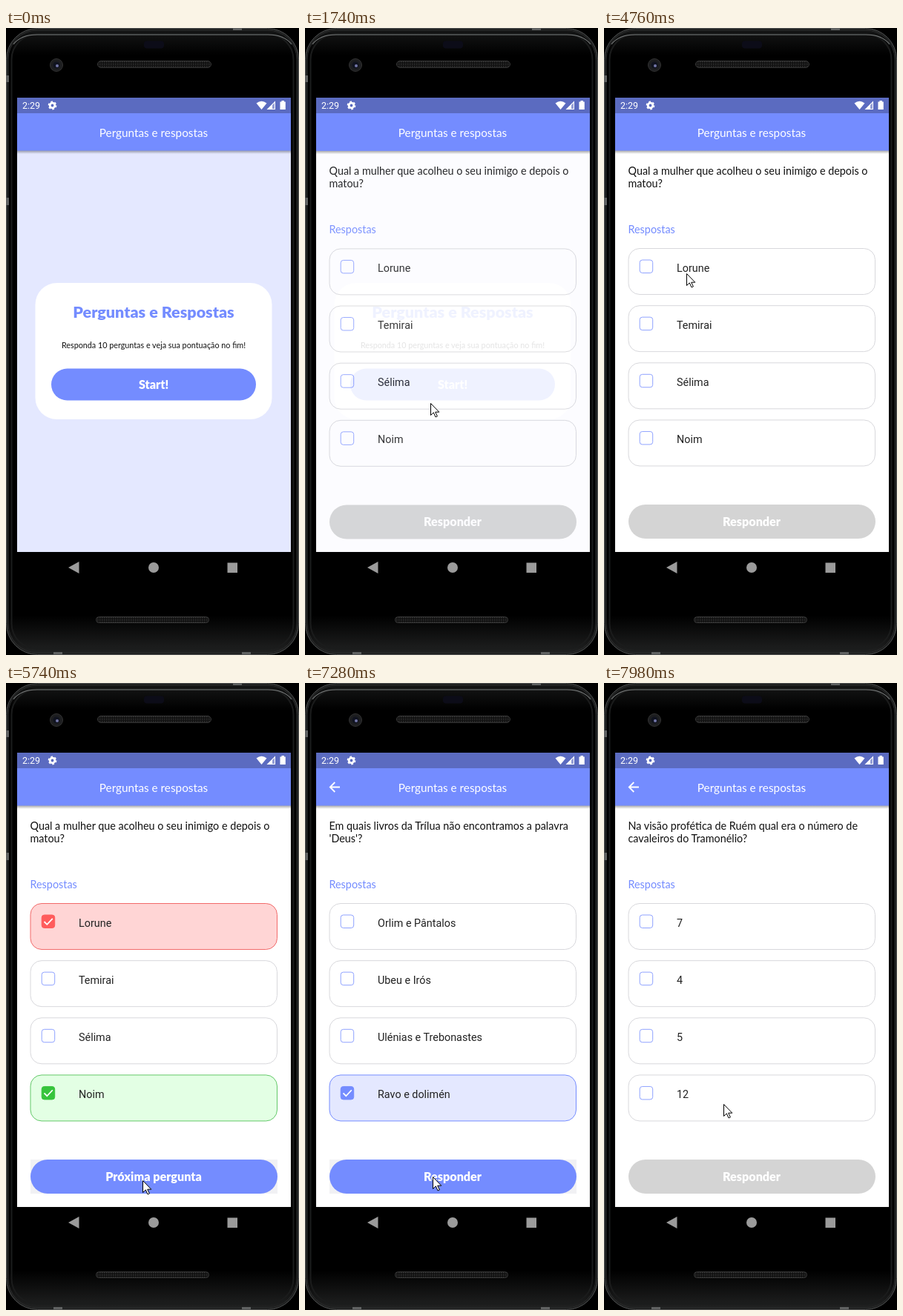
Animation, 395 px wide and 846 px high, one loop 8000 ms. Source, as an HTML page:

```html
<!DOCTYPE html>
<html lang="pt">
<head>
<meta charset="utf-8">
<style>
  html, body { margin: 0; width: 100%; height: 100%; overflow: hidden; background: #000; }
  svg { display: block; width: 395px; height: 846px; }
  text { font: 14.36px Lato, sans-serif; fill: #111; }
  .mid { text-anchor: middle; }
  .bar { font-size: 15.3px; fill: #fff; }
  .title { font-size: 21.5px; font-weight: 900; fill: #748cff; }
  .small { font-size: 10.77px; }
  .button { font-size: 16.15px; font-weight: 900; fill: #fff; }
  .label { fill: #748cff; }
  .option { font-family: Roboto, sans-serif; fill: #222; }
  .clock { font: 12.5px Roboto, sans-serif; fill: #fff; }
</style>
</head>
<body>
<svg viewBox="0 0 395 846">
  <defs>
    <clipPath id="screen"><path d="M15 94h369v613H15z"/></clipPath>
    <clipPath id="start"><rect x="61" y="459.5" width="276" height="43" rx="21.5"/></clipPath>
    <clipPath id="answer"><rect x="33" y="643" width="333" height="46" rx="23"/></clipPath>
    <linearGradient id="shade" x2="0" y2="1">
      <stop stop-opacity=".36"/><stop offset="1" stop-opacity="0"/>
    </linearGradient>
    <linearGradient id="body" x2="0" y2="1">
      <stop stop-color="#151616"/><stop offset=".04"/><stop offset=".94"/><stop offset="1" stop-color="#202121"/>
    </linearGradient>
    <pattern id="mesh" width="3" height="3" patternUnits="userSpaceOnUse">
      <path d="M0 0h3v3H0z" fill="#111"/><path d="M0 0h1.5v1.5H0z" fill="#333"/>
    </pattern>
  </defs>

  <rect x=".5" y=".5" width="394" height="845" rx="42" fill="#1d1e1e" stroke="#505252"/>
  <rect x="3" y="3" width="389" height="840" rx="39" fill="url(#body)" stroke="#2b2c2c"/>
  <rect x="7.5" y="8.5" width="380" height="829" rx="34" fill="none" stroke="#1b1c1c" stroke-width="2"/>
  <path d="M10 22Q20 9 42 9H353Q375 9 385 22" fill="none" stroke="#777a7a" stroke-width="1.2"/>
  <path d="M0 64h4v9H0zM0 229h4v10H0zM306 0h12v3h-12zM64 842h12v3H64zM318 842h12v3h-12z" fill="#606262"/>
  <rect x="186" y="17.500" width="27" height="10" rx="4" fill="#0c0c18"/>
  <circle cx="68" cy="50" r="8.500" fill="#1d1e20" stroke="#333"/>
  <circle cx="68" cy="50" r="4.500" fill="#10131f"/>
  <circle cx="69" cy="51" r="2" fill="#7377a8"/>
  <rect x="123.500" y="44.500" width="153" height="9" rx="4.500" fill="url(#mesh)" stroke="#363636"/>
  <rect x="121.500" y="794.500" width="152" height="8" rx="4" fill="url(#mesh)" stroke="#363636"/>
  <g fill="#9b9b9b">
    <path d="M84 728l14.500-8v16z"/><circle cx="199" cy="728" r="7"/><path d="M298.500 721.500h13.500v13.500h-13.500z"/>
  </g>

  <g id="view" clip-path="url(#screen)"></g>

  <path d="M15 94h369v21H15z" fill="#5b6bc0"/>
  <text class="clock" x="22" y="109">2:29</text>
  <g fill="none" stroke="#fff">
    <circle cx="62.500" cy="104.500" r="3.300" stroke-width="2.800"/>
    <circle cx="62.500" cy="104.500" r="5" stroke-width="1.800" stroke-dasharray="2.600"/>
  </g>
  <path d="M337.500 101.500Q344.500 96 351.500 101.500L344.500 110z" fill="#fff"/>
  <path d="M363 98.500V110H351.500z" fill="#fff" fill-opacity=".35"/>
  <path d="M363 98.500V110H351.500zM359 104v5h3v-8z" fill="#fff"/>
  <path d="M369.500 99.500h2v-1.500h3.500v1.500h1.800v10.500h-7.300z" fill="#fff"/>

  <path id="cursor" d="M.5.5v16l3.800-3.600 2.700 6 2.400-1-2.700-5.700h5.100z" fill="#fff" stroke="#000"/>
</svg>
<script>
const LOOP = 8000, SLIDE = 300, PAGE_RISE = 155;
const BLUE = '#748cff';
const view = document.getElementById('view');
const cursor = document.getElementById('cursor');

// Each question: times of entry, choice and reveal, and the right answer
const questions = [
  { enter: 1461, pick: 4830, reveal: 5600, choice: 0, right: 3,
    lines: ['Qual a mulher que acolheu o seu inimigo e depois o', 'matou?'],
    options: ['Lorune', 'Temirai', 'Sélima', 'Noim'] },
  { enter: 6169, pick: 6790, reveal: 7350, choice: 3, right: 0, back: true,
    lines: ['Em quais livros da Trílua não encontramos a palavra', "'Deus'?"],
    options: ['Orlim e Pântalos', 'Ubeu e Irós', 'Ulénias e Trebonastes', 'Ravo e dolimén'] },
  { enter: 7590, pick: Infinity, reveal: Infinity, back: true,
    lines: ['Na visão profética de Ruém qual era o número de', 'cavaleiros do Tramonélio?'],
    options: ['7', '4', '5', '12'] }
];

// time, x, y of the pointer tip
const moves = [
  [70, 350, 840], [720, 164, 466], [980, 164, 466], [1120, 167, 477], [1300, 167, 477],
  [1740, 169, 506], [2100, 169, 506], [2680, 104, 351], [3010, 104, 351], [3080, 110, 358],
  [3700, 110, 358], [4230, 111, 331], [4850, 111, 331], [5390, 178, 698], [5600, 184, 671],
  [6130, 184, 671], [6370, 168, 629], [6740, 55, 567], [6820, 54, 568], [6930, 45, 591],
  [7140, 172, 666], [7560, 172, 666], [7980, 161, 568]
];

const taps = [[1270, 167, 477, 'start'], [6020, 184, 671, 'answer'], [7460, 172, 666, 'answer']];

const looks = {
  idle: { fill: '#fff', line: '#d8d8dc' },
  picked: { fill: '#e4e8ff', line: '#748cff', box: BLUE },
  wrong: { fill: '#ffd5d5', line: '#f26a6a', box: '#ff5c5c' },
  right: { fill: '#e3ffe4', line: '#62c868', box: '#37c43c' }
};

const clamp = v => Math.min(1, Math.max(0, v));

function bezier(x1, y1, x2, y2) {
  const at = (a, b, s) => 3 * (1 - s) * (1 - s) * s * a + 3 * (1 - s) * s * s * b + s * s * s;
  return x => {
    let low = 0, high = 1;
    for (let i = 0; i < 24; i++) {
      const s = (low + high) / 2;
      if (at(x1, x2, s) < x) low = s; else high = s;
    }
    return at(y1, y2, high);
  };
}
const slideEase = bezier(.4, 0, .2, 1);
const fadeEase = bezier(.42, 0, 1, 1);

const text = (kind, x, y, words) => `<text class="${kind}" x="${x}" y="${y}">${words}</text>`;
const rect = (x, y, w, h, r, fill, line = 'none') =>
  `<rect x="${x}" y="${y}" width="${w}" height="${h}" rx="${r}" fill="${fill}" stroke="${line}"/>`;

function frame(background, back) {
  const arrow = '<path d="M47 140.500H34.500M40.300 134L33.800 140.500L40.300 147" fill="none" stroke="#fff" stroke-width="1.800"/>';
  return rect(15, 94, 369, 613, 0, background) + rect(15, 165, 369, 5, 0, 'url(#shade)') +
    rect(15, 94, 369, 71.5, 0, BLUE) + (back ? arrow : '') +
    text('bar mid', 199, 147, 'Perguntas e respostas');
}

function home() {
  return frame('#e4e8ff') + rect(39.5, 344, 319, 184, 29, '#fff') +
    text('title mid', 199, 391, 'Perguntas e Respostas') +
    text('small mid', 199, 432, 'Responda 10 perguntas e veja sua pontuação no fim!') +
    rect(61, 459.5, 276, 43, 21.5, BLUE) + text('button mid', 199, 487, 'Start!');
}

function option(words, i, look) {
  const y = 297.5 + i * 77.15;
  const tick = `<path d="M51.500 ${y + 24.5}l3.800 3.800 7.500-8" fill="none" stroke="#fff" stroke-width="1.800"/>`;
  return rect(33, y, 332.5, 62, 15, look.fill, look.line) +
    rect(48.2, y + 15.5, 17.5, 17.5, 3.5, look.box || '#fff', look.box || '#8fa2ff') +
    (look.box ? tick : '') + text('option', 98, y + 31, words);
}

function quiz(q, t) {
  const active = t >= q.pick, revealed = t >= q.reveal;
  const lookOf = i => revealed && i === q.right ? looks.right
    : active && i === q.choice ? (revealed ? looks.wrong : looks.picked) : looks.idle;
  return frame('#fff', q.back) +
    q.lines.map((line, i) => text('', 32.5, 198 + i * 17, line)).join('') +
    text('label', 32.5, 276.5, 'Respostas') +
    q.options.map((words, i) => option(words, i, lookOf(i))).join('') +
    (active ? rect(33, 643, 333, 46, 0, '#f1f1f4') : '') +
    rect(33, 643, 333, 46, 23, active ? BLUE : '#d4d4d4') +
    text('button mid', 199, 672, revealed ? 'Próxima pergunta' : 'Responder');
}

function ripple(t, [start, x, y, clip]) {
  const age = t - start;
  if (age < 0 || age > 300) return '';
  const r = 12 + Math.max(0, age - 130) * .6;
  return `<g clip-path="url(#${clip})"><circle cx="${x}" cy="${y}" r="${r}" fill="#fff" opacity="${.14 * (1 - age / 300)}"/></g>`;
}

function placeCursor(t) {
  cursor.style.display = t < moves[0][0] ? 'none' : '';
  let i = moves.findIndex(m => m[0] > t);
  if (i < 0) i = moves.length - 1;
  i = Math.max(1, i);
  const [t0, x0, y0] = moves[i - 1], [t1, x1, y1] = moves[i];
  const p = clamp((t - t0) / (t1 - t0)), e = p * p * (3 - 2 * p);
  cursor.setAttribute('transform', `translate(${x0 + (x1 - x0) * e} ${y0 + (y1 - y0) * e})`);
}

function draw(now) {
  const t = now % LOOP;
  let top = home(), shown = '';
  for (const q of questions) {
    const p = clamp((t - q.enter) / SLIDE);
    if (p <= 0) break;
    shown = p < 1 ? top : '';
    top = `<g opacity="${fadeEase(p)}" transform="translate(0 ${PAGE_RISE * (1 - slideEase(p))})">${quiz(q, t)}</g>`;
  }
  const picture = shown + top + taps.map(tap => ripple(t, tap)).join('');
  if (picture !== draw.last) view.innerHTML = draw.last = picture;
  placeCursor(t);
  requestAnimationFrame(draw);
}
requestAnimationFrame(draw);
</script>
</body>
</html>
```
